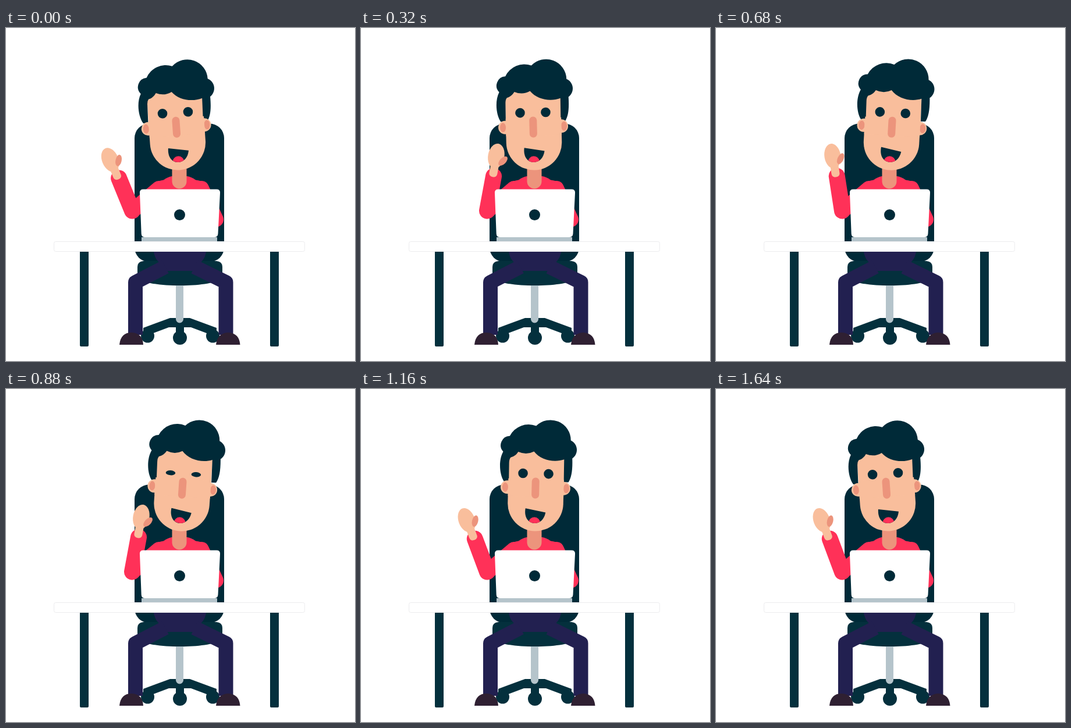
These frames come from a looping animation (600 by 573 pixels, 1680 ms). An HTML page:

```html
<!DOCTYPE html>
<html lang="en">
<head>
<meta charset="utf-8">
<title>Hello from the desk</title>
<style>
  html, body { margin: 0; width: 100%; height: 100%; overflow: hidden; background: #fff; }
  svg { display: block; width: 100%; height: 100%; }
  .ink { fill: #002a38; }
  .steel { fill: #04303d; }
  .skin { fill: #f9be9c; }
  .shade { fill: #ec947c; }
  .red { fill: #ff3158; }
  .grey { fill: #b5c4cb; }
  .shoe { fill: #2f2032; }
  .sleeve { fill: none; stroke: #ff3158; stroke-width: 26; stroke-linecap: round; }
  .leg { fill: none; stroke: #222050; stroke-width: 25; stroke-linejoin: round; }
</style>
</head>
<body>
<svg viewBox="0 0 600 573" xmlns="http://www.w3.org/2000/svg">
  <defs>
    <path id="mouth" d="M281.700 205.700L316.400 212C314.500 224 307 231 297.500 231C286 230.500 279.500 220 281.700 205.700Z"/>
    <clipPath id="lips"><use href="#mouth"/></clipPath>
  </defs>

  <!-- chair -->
  <rect class="ink" x="221" y="164.500" width="154" height="238" rx="25"/>
  <path class="steel" d="M236 401H362Q372 402 372 411V432C345 447 253 447 226 432V411Q226 402 236 401Z"/>
  <path class="steel" d="M282 499H316L362 516V524L350 527L318 515H280L248 527L236 524V516Z"/>
  <rect class="steel" x="292" y="505" width="14" height="20"/>
  <circle class="steel" cx="243.500" cy="530" r="11.500"/>
  <circle class="steel" cx="299" cy="533" r="12"/>
  <circle class="steel" cx="355.500" cy="530" r="11.500"/>
  <path class="grey" d="M292 443H305V501A6.500 6.500 0 0 1 292 501Z"/>

  <!-- legs -->
  <path fill="#222050" d="M253 380H345Q343 396 336 402L328 418H270L262 402Q255 396 253 380Z"/>
  <path class="leg" d="M222.500 528V437.500L274 411"/>
  <path class="leg" d="M378 528V437.500L324 411"/>
  <path class="shoe" d="M195 545Q197 524 216 524Q235 525 236 545Z"/>
  <path class="shoe" d="M361 545Q363 525 382 524Q401 525 402.500 545Z"/>

  <!-- torso -->
  <path class="red" d="M261 264Q266 262 271 261.500Q278 256 286 255H311Q319 256 326 261.500Q332 262 337 264V340H261Z"/>
  <path class="sleeve" d="M217 315L263 276"/>
  <path class="sleeve" d="M336 276L361 329.500"/>
  <path class="shade" d="M285.500 230H310.500V264A12.500 12.500 0 0 1 285.500 264Z"/>

  <g id="head">
    <path class="skin" d="M251 105H346.500V197A47.750 47.500 0 0 1 251 197Z"/>
    <path id="hair" class="ink" d="M243 160C235 148 233 124 241 109A16 16 0 0 1 252 82A36 36 0 0 1 297 64A35 35 0 0 1 357 88A18 18 0 0 1 360 119C361 140 359 152 354 160H346V121C329 127 306 123 294 108Q281 115 267 109Q262 117 254 119Q251.500 122 251.500 128V160Z"/>
    <circle class="skin" cx="249.500" cy="170" r="11.500"/>
    <circle class="skin" cx="346.500" cy="170" r="11.500"/>
    <ellipse class="shade" cx="246" cy="170" rx="5" ry="8"/>
    <ellipse class="shade" cx="351" cy="170" rx="5" ry="8"/>
    <rect class="skin" x="251" y="155" width="95.500" height="30"/>
    <ellipse class="ink eye" cx="276" cy="145.500" rx="8.300" ry="8.300"/>
    <ellipse class="ink eye" cx="320" cy="145.500" rx="8.300" ry="8.300"/>
    <rect class="shade" x="291.500" y="152.500" width="13" height="36" rx="6.500"/>
    <use class="ink" href="#mouth"/>
    <circle class="red" cx="297.500" cy="230.500" r="10" clip-path="url(#lips)"/>
  </g>

  <!-- waving forearm, drawn upright from the elbow -->
  <g id="arm">
    <path class="sleeve" style="stroke-width:28" d="M0 0V-60.500"/>
    <rect class="skin" x="-8.500" y="-86" width="14" height="27" rx="6"/>
    <ellipse class="skin" cx="-2" cy="-95.500" rx="14" ry="21.500"/>
    <ellipse class="shade" rx="5.200" ry="10" transform="translate(11 -89) rotate(34)"/>
  </g>

  <!-- laptop and desk -->
  <path fill="#fff" d="M236 277.500H362Q368.500 277.500 368 284L364.500 354Q364 360 358 360H239Q233 360 232.700 354L230 284Q229.500 277.500 236 277.500Z"/>
  <circle class="ink" cx="298.500" cy="321.500" r="9.500"/>
  <rect class="grey" x="233" y="360" width="130" height="8"/>
  <rect class="steel" x="127" y="383" width="15" height="165" rx="2"/>
  <rect class="steel" x="454" y="383" width="15" height="165" rx="2"/>
  <rect x="82.500" y="367.500" width="431" height="17" rx="3" fill="#fff" stroke="#ececee"/>
</svg>
<script>
  const LOOP = 1680, WAVE = 560, STEP = 40;
  const head = document.getElementById('head');
  const hair = document.getElementById('hair');
  const arm = document.getElementById('arm');
  const eyes = document.querySelectorAll('.eye');

  // smooth 0 -> 1 -> 0 over one period
  const swing = (t, period) => (1 - Math.cos(2 * Math.PI * t / period)) / 2;

  function draw(now) {
    const t = Math.floor(now % LOOP / STEP) * STEP;
    const tilt = -4 + 8 * swing(t, LOOP);
    const bend = -22.2 + 34.4 * swing(t, WAVE);
    const open = Math.min(1, Math.abs(t - LOOP / 2) / 80);
    head.setAttribute('transform', `rotate(${tilt} 298 246)`);
    // the hair leans less than the face
    hair.setAttribute('transform', `rotate(${-0.38 * tilt} 245 115)`);
    arm.setAttribute('transform', `translate(217 314.5) rotate(${bend})`);
    eyes.forEach(e => e.setAttribute('ry', Math.max(0.8, 8.3 * open)));
  }

  const start = performance.now();
  function tick() {
    draw(performance.now() - start);
    requestAnimationFrame(tick);
  }
  tick();
</script>
</body>
</html>
```
